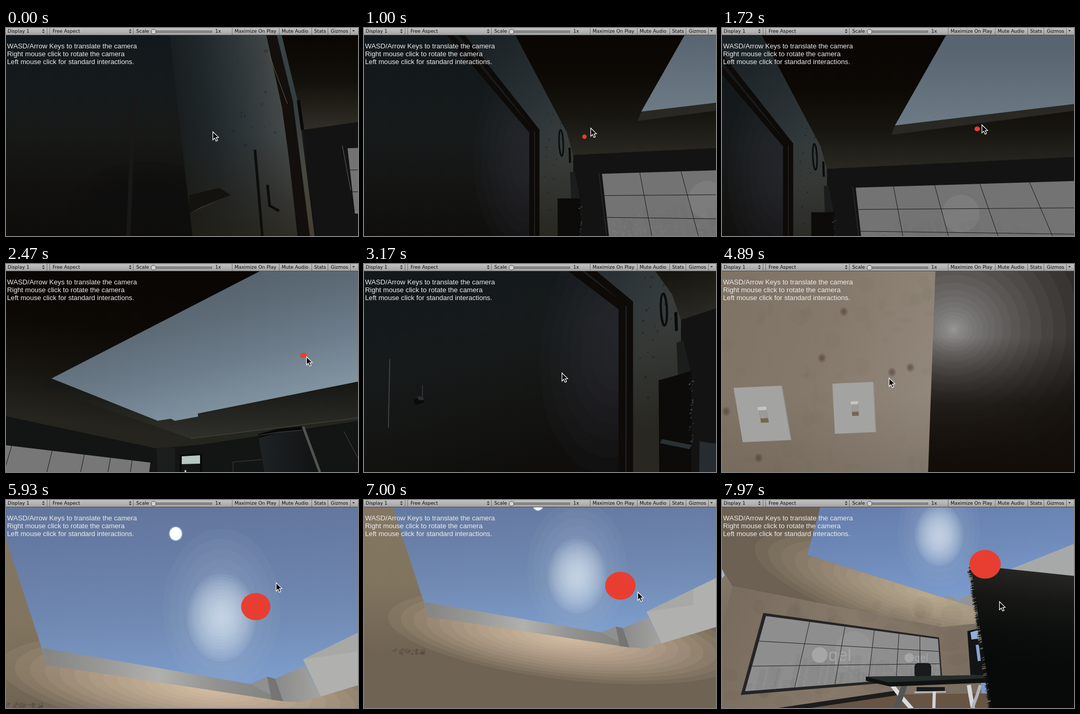
An HTML page with a canvas for the animation above (8 s loop, 673x398 px).

```html
<!DOCTYPE html>
<html lang="en">
<head>
<meta charset="utf-8">
<title>Room walkthrough</title>
<style>
html, body { margin: 0; width: 100%; height: 100%; overflow: hidden; background: #111; }
canvas { display: block; width: 673px; height: 398px; }
</style>
</head>
<body>
<canvas id="stage" width="673" height="398"></canvas>
<script>
const ctx = document.getElementById('stage').getContext('2d');
const W = 673, LOOP = 8000, BEAT = 72, LIGHTS_ON = 4330, FAR = 1500;
let now = 0;

const mix = (a, b, p) => a + (b - a) * p;
const smooth = p => p * p * (3 - 2 * p);

function seeded(s) {
  return () => (s = (s * 16807) % 2147483647) / 2147483647;
}
function trace(p) {
  ctx.beginPath();
  for (let i = 0; i < p.length; i += 2) ctx.lineTo(p[i], p[i + 1]);
}
function poly(fill, ...p) {
  trace(p);
  ctx.fillStyle = fill;
  ctx.fill();
}
function line(color, width, ...p) {
  trace(p);
  ctx.strokeStyle = color;
  ctx.lineWidth = width;
  ctx.stroke();
}
function oval(fill, x, y, rx, ry = rx, tilt = 0) {
  ctx.beginPath();
  ctx.ellipse(x, y, rx, ry, tilt, 0, 7);
  ctx.fillStyle = fill;
  ctx.fill();
}
function ramp(x0, y0, x1, y1, ...colors) {
  const g = ctx.createLinearGradient(x0, y0, x1, y1);
  colors.forEach((c, i) => g.addColorStop(i / (colors.length - 1), c));
  return g;
}
const down = (...colors) => ramp(0, 14, 0, 398, ...colors);

function backdrop(fill) {
  ctx.fillStyle = fill;
  ctx.fillRect(-FAR, -FAR, 3 * FAR, 3 * FAR);
}
function local(draw) {
  ctx.save();
  draw();
  ctx.restore();
}
function clipped(p, draw) {
  local(() => { trace(p); ctx.clip(); draw(); });
}
// Light that falls off in visible steps
function rings(color, alpha, n, x, y, rx, ry, power = 1, tilt = 0) {
  local(() => {
    ctx.globalAlpha = alpha;
    for (let i = 0; i < n; i++) {
      const s = Math.pow(1 - i / n, power);
      oval(color, x, y, rx * s, ry * s, tilt);
    }
  });
}
function blotches(seed, n, x, y, w, h, size, color) {
  const rnd = seeded(seed);
  for (let i = 0; i < n; i++)
    oval(color, x + rnd() * w, y + rnd() * h, size * (.4 + rnd()), size * (.4 + rnd()));
}
function label(text, x, y, size, color) {
  ctx.font = size + 'px "Liberation Sans", sans-serif';
  ctx.fillStyle = color;
  ctx.fillText(text, x, y);
}

// Tiled display on a quad (clockwise from top left); depth > 1 crowds the far right columns
function display(quad, depth, fill, lineColor, marks) {
  const [ax, ay, bx, by, cx, cy, dx, dy] = quad;
  const at = (u, v) => {
    const f = depth * u / (1 + (depth - 1) * u);
    return [mix(mix(ax, bx, f), mix(dx, cx, f), v), mix(mix(ay, by, f), mix(dy, cy, f), v)];
  };
  poly(fill, ...quad);
  clipped(quad, () => {
    const rnd = seeded(31), n = 34;
    oval('rgba(190,190,190,.12)', ...at(.4, .4), 36);
    for (let i = 0; i < n; i++) {
      const top = .9 - .45 * rnd(), u = i / n, r = u + (.5 + rnd()) / n;
      poly('rgba(100,100,100,.13)', ...at(u, 1), ...at(u, top), ...at(r, top), ...at(r, 1));
    }
    for (let i = 0; i < 200; i++)
      oval('rgba(175,175,175,.22)', ...at(rnd(), 1 - .45 * rnd() * rnd()), 1.2);
  });
  for (const [u, v, r] of marks) {
    const [x, y] = at(u, v);
    oval('#a6a6a6', x, y, r);
    label('qel', x + r * 1.1, y + r * .75, r * 2.2, '#a6a6a6');
  }
  for (let i = 1; i < 6; i++) line(lineColor, 1, ...at(i / 6, 0), ...at(i / 6, 1));
  for (let i = 1; i < 3; i++) line(lineColor, 1, ...at(0, i / 3), ...at(1, i / 3));
}
const darkDisplay = () =>
  display([455, 279, 1009, 262, 1105, 425, 469, 404], .75, '#737373', '#191919', []);

function plaster(shade, warm, edge) {
  poly(shade, ...edge);
  poly(ramp(0, 200, 0, 398, 'rgba(36,30,19,0)', warm), ...edge);
}

function doorEdge() {
  backdrop(down('#12181c', '#151a1c', '#171917', '#121110', '#0e0d0b'));
  rings('#0f0f0e', .25, 5, 270, 350, 150, 95);
  line('#191817', 8, 245, 125, 234, 398);
  plaster(ramp(320, 200, 535, 170, '#171b1c', '#20272a', '#30373a', '#454a49'), 'rgba(36,29,18,.62)',
    [300, -100, 475, -100, 530, 150, 575, 560, 375, 560]);
  blotches(21, 14, 435, 30, 80, 220, 3, 'rgba(18,22,23,.25)');
  line('#0e0d0b', 5, 476, 233, 490, 398);
  line('#0d0c0a', 5, 500, 300, 504, 340, 522, 350);
  poly('#14120f', 350, 320, 408, 306, 430, 320, 350, 355);
  poly('#3b392d', 350, 355, 372, 343, 431, 319);
  poly(ramp(0, 14, 0, 190, '#0a0603', '#12100b', '#302d25'), 475, -100, FAR, -100, FAR, 62, 568, 195);
  poly('#131313', 568, 195, FAR, 62, FAR, 560, 610, 560);
  line('#120f0c', 27, 487, -100, 541, 150, 597, 560);
  line(down('#3a454a', '#343c3e', '#474841', '#443e31'), 9, 495, -100, 553, 140, 606, 560);
  line('#6a5948', 1, 502, 48, 538, 145);
  line('#080808', 6, 559, 138, 567, 195);
  local(() => { ctx.translate(198, -49); darkDisplay(); });
  line('#606060', 1, 643, 225, 659, 310);
}

function corner() {
  backdrop(down('#12181b', '#14191b', '#161a1a', '#141513', '#0f0e0d'));
  rings('#343b3d', .08, 8, 320, 250, 110, 200);
  plaster(ramp(220, 30, 400, 235, '#1a2226', '#283034', '#3b4140'), 'rgba(32,28,21,.7)',
    [110, -80, 240, -80, 388, 200, 400, 243, 416, 560, 330, 560, 330, 195]);
  blotches(5, 20, 345, 120, 45, 250, 1.3, 'rgba(14,18,19,.4)');
  line('#0d0a08', 10, 85, -80, 321, 198, 321, 900);
  line('#0d0a08', 9, 113, -80, 331, 196, 331, 900);
  line('#2a2f30', 1, 326, 198, 326, 900);
  poly(ramp(0, 14, 0, 243, '#0a0603', '#0c0905', '#171510', '#2a2822'),
    240, -80, FAR, -80, FAR, 190, 400, 243, 388, 200);
  poly('#292822', 530, 160, FAR, 44, FAR, 49, 523, 178);
  poly(ramp(0, 14, 0, 160, '#586570', '#6d7b86'), 666, -80, FAR, -80, FAR, 44, 530, 160);
  poly('#131313', 400, 243, FAR, 190, FAR, 900, 402, 900);
  poly('#262c2f', 425, 437, FAR, 964, 420, 964);
  darkDisplay();
  line('#343434', 1, 449, 277, 464, 398);
  ctx.beginPath();
  ctx.ellipse(377, 220, 4, 25, -.05, 0, 7);
  ctx.strokeStyle = '#0c0d0d';
  ctx.lineWidth = 3;
  ctx.stroke();
  line('#090a0a', 4, 393, 229, 394, 258);
  poly('#1b1d1c', 394, 276, 403, 275, 413, 326, 396, 326);
  poly('#0c0b09', 370, 326, 414, 326, 413, 900, 373, 900);
  line('#293134', 6, 373, 420, 413, 442);
  blotches(16, 22, 411, 335, 6, 100, 1.2, '#3a3c3a');
}

function farDoor() {
  corner();
  line('#4a5053', 1, 8, 178, 6, 282);
  line('#3a4043', 1, 52, 232, 52, 248);
  poly('#0a0b0b', 40, 250, 54, 250, 54, 259, 42, 259);
  poly('#273034', 45, 247, 53, 249, 54, 255, 47, 253);
}

function skylight() {
  backdrop(ramp(150, 20, 110, 300, '#0a0603', '#0c0905', '#16140f', '#25241e'));
  poly(ramp(0, 230, 0, 335, '#171714', '#30312b'), 67, 234, 87, 219, 290, 300, FAR, 60, FAR, 192, 353, 334);
  poly(ramp(330, 20, 400, 295, '#526069', '#5d6b77', '#6d7d8b', '#8294a2'),
    87, 219, 675, -84, FAR, -84, FAR, 60, 367, 286, 367, 292, 323, 300, 315, 296, 290, 300);
  poly('#25251f', 353, 334, FAR, 192, FAR, 210, 370, 346, 288, 353);
  poly('#131414', -300, 227, 288, 353, 370, 346, FAR, 175, FAR, 900, -300, 900);
  line('#3d3e38', 1.5, 353, 334, FAR, 192);
  poly('#1c1e1d', 288, 353, 323, 351, 323, 398, 290, 398);
  display([-90, 336, 276, 380, 255, 560, -180, 600], 1.9, '#777', '#161616', []);
  line('#080808', 4, 334, 398, 334, 367, 373, 365, 373, 398);
  poly('#b7c7c2', 336, 368, 371, 366, 371, 382, 336, 383);
  oval('#ddd', 343, 397, 1.5, 3);
  line('#2c2b22', 2, 434, 398, 434, 379, 490, 374);
  poly(ramp(485, 0, 600, 0, '#1e2224', '#171a1b', '#111313'), 482, 326, 568, 312, 600, 398, 494, 398);
  line('#080808', 7, 483, 329, 520, 319, 567, 314);
  line('#42484a', 1, 484, 328, 520, 322, 566, 318);
  line('#53534e', 5, 568, 311, 600, 398);
  line('#484848', 1, 646, 320, 673, 372);
}

// Wall switch on a unit plate
function plate(x, y, w, h, lean) {
  local(() => {
    ctx.transform(w, -.045 * w, lean * h, h, x, y);
    const box = (fill, l, t, bw, bh) => poly(fill, l, t, l + bw, t, l + bw, t + bh, l, t + bh);
    box('#a3a3a1', 0, 0, 1, 1);
    box('#8c8c89', .985, 0, .015, 1);
    box('#75664f', .44, .4, .16, .26);
    box('#9b9b99', .44, .42, .16, .16);
    box('#c5c5c3', .42, .37, .18, .06);
  });
}

function switches() {
  backdrop('#211e1b');
  rings('#fff', .035, 25, 443, 125, 300, 285, 2.6);
  backdrop(ramp(0, 140, 0, 398, 'rgba(18,13,9,0)', 'rgba(18,13,9,.75)', 'rgba(18,13,9,1)'));
  const wall = [-FAR, -600, 430, -600, 408, 14, 394, 398, 380, 900, -FAR, 900];
  poly(ramp(0, 60, 405, 200, '#7f7365', '#85796b', '#91877a'), ...wall);
  clipped(wall, () => {
    backdrop(ramp(0, 250, 0, 398, 'rgba(100,89,76,0)', 'rgba(100,89,76,.4)'));
    blotches(44, 60, 0, 20, 400, 375, 12, 'rgba(85,72,57,.04)');
    for (const [x, y] of [[233, 91], [191, 180], [325, 207], [360, 198], [70, 371], [8, 282]])
      rings('#463b2f', .13, 6, x, y, 8, 9);
  });
  plate(22, 237, 93, 104, .17);
  plate(211, 229, 79, 96, .05);
  if (now < LIGHTS_ON) backdrop('rgba(8,8,8,.8)');
}

function sun(x, y, size) {
  rings('#a9b2c9', .06, 8, x, y - 15 * size, 112 * size, 155 * size);
  rings('#d9e0f4', .085, 14, x, y, 66 * size, 84 * size);
}

function openSky() {
  backdrop(ramp(330, 14, 350, 350, '#62769d', '#697fa8', '#718bb4', '#7d9dcc'));
  sun(412, 225, 1);
  oval('#92abd0', 324.5, 64.5, 13, 14);
  oval('#fff', 324.5, 64.5, 11.5, 12.5);
  clipped([-FAR, -600, -227, -600, 0, 75, 79, 316, 561, 387, FAR, 80, FAR, 900, -FAR, 900], () => {
    backdrop(ramp(0, 80, 0, 398, '#837662', '#81745f', '#6f6353'));
    rings('#f3dabd', .07, 15, 385, 362, 400, 95, 1.1, .12);
    blotches(18, 30, 0, 388, 70, 12, 3, 'rgba(74,62,50,.3)');
  });
  poly(ramp(75, 300, 510, 370, '#858584', '#989896', '#b0b0ad', '#929290', '#828280'),
    70, 283, 467, 352, 529, 385, 79, 316);
  poly('#8f908f', 467, 352, 499, 338, 529, 385);
  poly('#747574', 499, 338, 515, 342, 530, 385, 508, 382);
  poly(ramp(515, 0, 600, 0, '#8a8b8a', '#a3a3a1'), 515, 342, 572, 317, 602, 376, 561, 387, 530, 385);
  poly('#b0b1af', 568, 305, FAR, -148, FAR, 105, 602, 376);
  poly('#a8a8a6', 568, 305, 673, 254, 673, 290);
}

function furBlock() {
  poly(ramp(570, 130, 550, 310, '#262622', '#161715', '#0c0e0d', '#080a0a'),
    472, 128, 528, 130, FAR, 233, FAR, 900, 585, 900);
  const rnd = seeded(77), edge = y => 472 + (y - 128) * .148;
  for (let y = 130; y < 398; y += 1.4)
    line(rnd() < .3 ? '#8b8375' : '#151614', 1, edge(y) + 4, y, edge(y) - rnd() * 4, y + 2);
}

function leg(color, width, x, lean) {
  line(color, width, x, 354, x + lean * .4, 374, x + lean, 400);
}

function litRoom() {
  backdrop(ramp(330, 14, 350, 200, '#667fae', '#6f8bba', '#7c9bcd'));
  sun(415, 68, .7);
  poly('#a7a9a9', 530, 141, FAR, -245, FAR, 300);
  clipped([-FAR, -400, 300, -400, 188, 14, 163, 105, 486, 206, 486, 237, 420, 243, 20, 165, -FAR, -300], () => {
    backdrop('#6c6152');
    rings('#ecd0b0', .06, 14, 390, 182, 340, 85, 1.1, .28);
  });
  poly('#929495', 425, 187, 436, 183, 451, 192, 480, 178, 486, 206);
  poly(ramp(0, 180, 480, 330, '#776b5d', '#877a6b', '#796d5f'),
    -FAR, -300, 20, 165, 420, 243, 490, 236, 520, 900, -FAR, 900);
  poly(ramp(0, 130, 0, 398, '#85796a', '#655a4c'), -300, 0, 0, 132, 20, 165, 0, 245, -300, 600);
  poly('#a9bccf', 0, 132, 5, 144, 0, 150);
  blotches(51, 70, 15, 200, 440, 190, 16, 'rgba(65,54,43,.045)');
  poly('#685443', 120, 402, 330, 372, 512, 370, 512, 900, 120, 900);
  line('#1c1c1c', 9, 90, 405, 335, 369);

  poly('#242424', 79, 216, 415, 263, 421, 341, 36, 373);
  display([84, 222, 413, 266, 418, 337, 44, 366], 1.7, '#8e8e8f', '#242424', [[.24, .5, 15], [.75, .52, 9]]);

  poly('#121416', 469, 251, 490, 246, 505, 335, 475, 335);
  poly('#91afd8', 475, 253, 489, 249, 492, 265, 477, 267);
  line('#88a6d0', 6, 488, 277, 492, 308);

  ctx.fillStyle = '#181a1b';
  ctx.beginPath();
  ctx.roundRect(368, 312, 32, 28, 7);
  ctx.fill();
  line('#17191a', 8, 372, 362, 426, 362);
  line('#b9bbbd', 3, 368, 368, 428, 367);
  line('#d4d6d8', 6, 406, 366, 405, 398);
  leg('#dadcdd', 8, 325, 38);
  leg('#515557', 11, 349, -17);
  leg('#d5d8da', 8, 472, 8);
  leg('#b1b5b8', 6, 494, -16);
  poly('#101212', 275, 338, 520, 335, 520, 349, 322, 357, 275, 346);
  poly('#262c2a', 275, 338, 520, 335, 520, 340, 318, 349);
  furBlock();
}

const pan = (x, y, k = 1) => [k, 0, 0, k, x, y];
const doorLens = [1.42, -.4, 0, 1.25, 38, -37];

// move carries a view onto the next one
const keys = [
  { t: 0, draw: doorEdge, move: pan(-190, 50), cur: [395, 198], dot: [412, 200, 0, 0] },
  { t: 1000, draw: corner, move: pan(-443, 59), cur: [433, 191], dot: [421.5, 208, 4.2, 4.2] },
  { t: 2470, draw: skylight, move: pan(443, -59), cur: [574, 177], dot: [569, 175, 6.5, 5] },
  { t: 2820, draw: corner, move: doorLens, cur: [470, 193], dot: [455, 200, 4, 4] },
  { t: 3170, draw: farDoor, lens: doorLens, move: pan(-937, -160, 2.2), cur: [378, 208], dot: [390, 205, 0, 0] },
  { t: 4890, draw: switches, move: pan(-330, 250, .8), cur: [319, 218], dot: [380, 210, 0, 0] },
  { t: 5930, draw: openSky, move: pan(114, -93, .7), cur: [516, 158], dot: [477.5, 204, 28, 26] },
  { t: 7970, draw: litRoom, cur: [530, 194], dot: [503, 123, 30, 27.5] }
];
const still = pan(0, 0);

function scene(a, b, p) {
  const move = a.move || still;
  const shown = p < .5 ? a : b;
  const m = new DOMMatrix(still.map((v, i) => mix(v, move[i], p)));
  if (shown !== a) m.multiplySelf(new DOMMatrix(move).inverse());
  m.multiplySelf(new DOMMatrix(shown.lens || still));
  ctx.setTransform(m);
  shown.draw();
  ctx.resetTransform();
}

function pointer(x, y) {
  local(() => {
    ctx.translate(x, y);
    trace([.5, .5, .5, 16, 4, 12.7, 6.6, 18.5, 9.3, 17.2, 6.8, 11.6, 11.5, 11.4]);
    ctx.closePath();
    ctx.fillStyle = '#050505';
    ctx.strokeStyle = '#fff';
    ctx.lineWidth = 1.2;
    ctx.fill();
    ctx.stroke();
  });
}

function toolbar() {
  ctx.fillStyle = ramp(0, 0, 0, 13, '#c2c2c2', '#a3a3a3');
  ctx.fillRect(0, 0, W, 13);
  ctx.fillStyle = '#4c4c4c';
  ctx.fillRect(0, 13, W, 1);
  ctx.fillStyle = '#707070';
  for (const x of [78, 83, 243, 432, 522, 584, 615, 658]) ctx.fillRect(x, 0, 1, 13);
  ctx.font = '9px "DejaVu Sans", sans-serif';
  ctx.fillStyle = '#0c0c0c';
  for (const [s, x] of [['Display 1', 3], ['Free Aspect', 89], ['Scale', 249], ['1x', 400],
    ['Maximize On Play', 437], ['Mute Audio', 527], ['Stats', 589], ['Gizmos', 621]])
    ctx.fillText(s, x, 9);
  const arrow = (x, y, h) => poly('#333', x - 2.5, y, x + 2.5, y, x, y + h);
  for (const x of [71.5, 237.5]) {
    arrow(x, 5, -3);
    arrow(x, 7, 3);
  }
  arrow(664.5, 4, 3);
  line('#626262', 4, 277, 7, 394, 7);
  line('#929292', 2, 278, 7, 393, 7);
  oval('#555', 282, 7, 5);
  oval('#d2d2d2', 282, 7, 4);
}

function frame(t) {
  now = t;
  const i = keys.findLastIndex(k => t >= k.t);
  const a = keys[i], b = keys[i + 1] || a;
  const beat = Math.max(a.t, 30 + Math.floor((t - 30) / BEAT) * BEAT);
  const p = a === b ? 0 : smooth((beat - a.t) / (b.t - a.t));
  scene(a, b, p);

  const at = name => a[name].map((v, j) => mix(v, b[name][j], p));
  const dot = at('dot');
  if (dot[2] > .5) oval('#e83e31', ...dot);
  ['WASD/Arrow Keys to translate the camera', 'Right mouse click to rotate the camera',
    'Left mouse click for standard interactions.'].forEach((s, n) => label(s, 2, 39 + 15 * n, 13.18, '#ededed'));
  pointer(...at('cur'));
  toolbar();
}

function tick() {
  frame(performance.now() % LOOP);
  requestAnimationFrame(tick);
}
tick();
</script>
</body>
</html>
```
